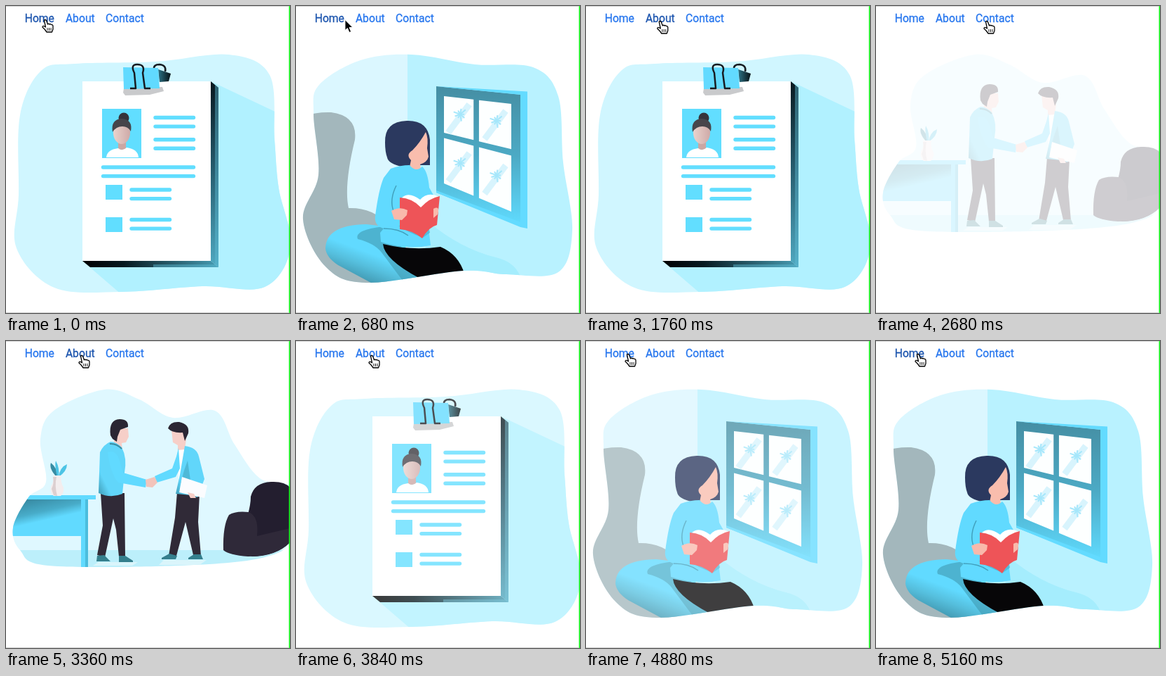
An HTML page for the animation above (5.2 s loop, 405 by 436 pixels).

```html
<!DOCTYPE html>
<html lang="en">
<head>
<meta charset="utf-8">
<title>Page transitions</title>
<style>
  html, body { margin: 0; width: 100%; height: 100%; overflow: hidden; background: #fff; }
  svg { display: block; width: 100vw; height: 100vh; }
  text { font: 15.7px Roboto, Inter, sans-serif; stroke-width: .3; }
  .sky { fill: #61daff; }
  .ink { fill: #2b2633; }
  .pants { fill: #302a37; }
  .shoe { fill: #347f8d; }
  .skin { fill: #f6cfc8; }
</style>
</head>
<body>
<svg viewBox="0 0 405 436">
  <defs>
    <linearGradient id="edgeBottom"><stop stop-color="#000"/><stop offset=".3" stop-color="#07191f"/><stop offset="1" stop-color="#479db4"/></linearGradient>
    <linearGradient id="edgeRight" x2="0" y2="1"><stop stop-color="#08181e"/><stop offset=".45" stop-color="#24596a"/><stop offset="1" stop-color="#4fa9c1"/></linearGradient>
    <linearGradient id="clipSide"><stop stop-color="#2b7386"/><stop offset="1" stop-color="#071014"/></linearGradient>
    <linearGradient id="portrait"><stop stop-color="#e9d3cd"/><stop offset="1" stop-color="#cfaaa8"/></linearGradient>
    <linearGradient id="cushion" x1=".1" y1=".9" x2=".5" y2=".2"><stop stop-color="#347f94"/><stop offset=".45" stop-color="#55bedc"/><stop offset=".7" stop-color="#61daff"/></linearGradient>
    <linearGradient id="frame" x2="0" y2="1"><stop stop-color="#458ea3"/><stop offset=".5" stop-color="#4caac5"/><stop offset="1" stop-color="#60dcff"/></linearGradient>
    <linearGradient id="deskFace" x2=".5" y2="1"><stop stop-color="#317d94"/><stop offset=".45" stop-color="#48acc9"/><stop offset=".65" stop-color="#61daff"/></linearGradient>
    <linearGradient id="jacket" x1="0" y1="1" x2=".5" y2=".5"><stop stop-color="#3b98b2"/><stop offset=".5" stop-color="#61d6fa"/></linearGradient>
    <clipPath id="aboutClip"><path data-smooth="20,155 50,92 98,82 214,79 318,69 376,98 383,190 389,259 406,342 369,399 280,398 165,406 69,400 15,344 18,268"/></clipPath>
    <clipPath id="homeClip"><path data-smooth="25,153 33,112 92,77 165,69 255,83 338,87 374,128 381,222 394,318 374,378 300,381 238,376 100,393 42,370 10,303 32,240"/></clipPath>
    <clipPath id="contactClip"><path data-smooth="10,265 32,222 57,200 49,140 68,99 140,69 190,83 238,109 298,99 326,147 362,195 410,210 408,280 365,308 245,319 60,319 20,297"/></clipPath>
  </defs>

  <g id="about">
    <g clip-path="url(#aboutClip)">
      <path fill="#d0f6ff" d="M0 60h405v350H0z"/>
      <path fill="#b1f1ff" d="M292 107L405 160V410H165L109 362z"/>
    </g>
    <path fill="url(#edgeBottom)" d="M109 362H292L303 371H120z"/>
    <path fill="url(#edgeRight)" d="M292 107L303 116V371L292 362z"/>
    <path fill="#5bbbd3" opacity=".45" d="M298 112L303 116V371H210V367H298z"/>
    <path fill="#fff" d="M109 107H292V362H109z"/>
    <path fill="#c9cacc" d="M168 117L223 115 225 121 205 126 170 127 167 123z"/>
    <path fill="none" stroke="#171b20" stroke-width="2.6" d="M211 90Q210 83 219 83 229 84 227 93"/>
    <path fill="url(#clipSide)" d="M217 90L235 96 232 107 219 108z"/>
    <path class="sky" d="M167 87L217 88 219 117 168 118z"/>
    <path fill="none" stroke="#171b20" stroke-width="2.5" stroke-linejoin="round" d="M177 117H185L183 95Q177 83 187 83 199 83 195 95L198 117H206"/>
    <path fill="#61deff" d="M137 146h56v70h-56zM142 254h24v21h-24zM142 300h24v21h-24z"/>
    <circle cx="168" cy="159" r="7.5" fill="#35333a"/>
    <path fill="#caa7a4" d="M160 190h11v14h-11z"/>
    <path fill="#fff" d="M143 215Q144 204 160 202 166 207 172 201 188 203 189 215z"/>
    <ellipse cx="165" cy="180" rx="12" ry="16" fill="url(#portrait)"/>
    <path fill="#46444a" d="M152 179Q149 161 165 160 181 161 178 178 174 171 166 171 157 171 152 179z"/>
    <path id="bars" stroke="#61deff" stroke-width="5.4" stroke-linecap="round"/>
  </g>

  <g id="home">
    <g clip-path="url(#homeClip)">
      <path fill="#dbf7ff" d="M0 60h160v340H0z"/>
      <path fill="#b9f2ff" d="M159 60h246v340H159z"/>
      <path fill="#a5edfd" d="M188 306Q235 345 285 357 315 364 322 390H180z"/>
      <path fill="#a3b7bc" d="M0 160Q25 150 50 151 88 156 84 190 68 255 75 287 110 286 130 310V410H0z"/>
      <path fill="url(#cushion)" d="M42 344Q43 311 100 310L145 315 180 400H120L60 368Q43 357 42 344z"/>
      <path fill="#4099b1" opacity=".6" d="M125 313Q82 318 88 331 112 337 122 350L152 390H180L134 316z"/>
      <path fill="#070608" d="M124 338Q165 348 206 342 232 353 240 380L175 386Q126 360 124 338z"/>
    </g>
    <path fill="url(#frame)" d="M200 114L322 126V313L200 265z"/>
    <path fill="#63dbff" d="M200 114L330 121.500V316L320 314V126zM200 262L320 307V314L200 265z"/>
    <g id="panes"></g>
    <path fill="#2b395f" d="M127 194Q126 164 158 163 188 162 191 190V226H177L154 229Q131 224 130 215 127 207 127 194z"/>
    <path fill="#f9bdad" d="M185 179Q189 187 187 202L189 214Q187 222 177 225L179 237 160 238 164 219Q156 211 166 205 177 194 185 179z"/>
    <path class="sky" d="M135 231Q149 226 162 226 171 237 180 228 188 235 190 258L198 272 187 298 192 340Q157 347 121 335L120 322 125 316Q111 312 113 298 118 260 125 244z"/>
    <path fill="none" stroke="#42a1bd" stroke-width="1.500" d="M143 255Q133 275 139 291M125 316Q147 316 160 326"/>
    <path fill="#4aaec9" opacity=".65" d="M146 312Q160 322 181 329L191 322 190 317z"/>
    <path fill="#fff" d="M151 272Q161 263 177 275 188 263 204 271L178 291z"/>
    <path fill="#ee5458" d="M148 272Q166 273 178 286 190 273 205 270L201 311Q189 314 180 330 165 318 148 317z"/>
    <path fill="#f9b9ab" d="M136 291Q148 284 159 290L158 297 151 304 140 303zM196 288Q206 283 202 296L196 301z"/>
  </g>

  <g id="contact">
    <g clip-path="url(#contactClip)">
      <path fill="#dff8ff" d="M0 60h412v240H0z"/>
      <path fill="#bceffb" d="M0 297h412v28H0z"/>
      <path fill="url(#deskFace)" d="M0 224h117v53H0z"/>
      <path class="sky" d="M0 219h128v6H0zM107 225h10v100h-10z"/>
      <path fill="#4bbddd" d="M113 225h4v100h-4z"/>
      <path fill="#daf5fb" d="M132 314h56l-8 5h-56zM225 311h61l-10 7h-58z"/>
    </g>
    <path fill="#231e2f" d="M345 246Q349 232 349 221 354 201 378 200 397 199 405 208V286Q385 306 350 306z"/>
    <path fill="#2f2939" d="M310 297Q309 262 318 247 327 241 346 243 361 249 358 277L405 266V286Q385 306 345 306 318 304 310 297z"/>
    <path fill="#388ca3" d="M72 193Q61 181 64 173 73 180 74 193z"/>
    <path fill="#4dc4e5" d="M73 193Q69 176 71 170 77 181 75 193zM75 193Q77 179 87 175 87 185 75 193z"/>
    <path fill="#f3edee" d="M67 191h12Q77 199 82 208 83 216 78 220H68Q62 216 64 206 69 200 67 191z"/>
    <path fill="#dccfd0" d="M67 193Q69 202 65 210L68 219 73 220Q69 205 72 193z"/>

    <g id="visitor">
      <path class="pants" d="M135 216h34L170 306H161L157 268 153 252 141 307 130 304 138 262z"/>
      <path class="shoe" d="M130 305l10-1 9 9h-20zM161 305h9l11 7v2h-20z"/>
      <path class="skin" d="M158 124h16l1 12-4 8-6 1 1 10h-12V137z"/>
      <path class="ink" d="M149 134Q146 112 162 111 175 111 174 122L163 126 159 136 158 143 152 139z"/>
      <path fill="url(#jacket)" d="M149 143Q157 143 165 151 173 166 169 187L166 217Q149 224 132 216L134 158Q139 147 149 143z"/>
      <path class="sky" d="M145 158Q156 154 161 167L167 187 201 197 199 208 160 201Q149 189 145 158z"/>
      <path fill="none" stroke="#398ca2" stroke-width="2" d="M148 146Q157 145 165 153"/>
    </g>
    <g id="host">
      <path class="pants" d="M244 215l32 2-2 40 4 48-10 3-12-51-13 48H232L241 251z"/>
      <path class="shoe" d="M233 302l11 3-2 5H222v-2zM268 303h10l3 7H260v-2z"/>
      <path fill="#fff" d="M246 151L257 149 259 190 246 196z"/>
      <path class="skin" d="M236 127l20-1 1 13-2 15-10 1V148l-7-4z"/>
      <path class="ink" d="M231 124Q234 114 247 115 262 118 260 131L255 142 252 130Q237 131 231 124z"/>
      <path fill="url(#jacket)" d="M255 149Q272 151 275 164L283 196 273 222 264 219 242 217 248 190z"/>
      <path class="sky" d="M246 152L243 164 237 181 212 192 215 201 242 193 248 181z"/>
      <path fill="#3e9cb4" opacity=".5" d="M259 170L263 198 249 202 254 184z"/>
      <path fill="#fbfcfe" d="M251 193L287 205 283 223 247 215z"/>
      <path class="skin" d="M259 215l9 2 3 6h-8z"/>
    </g>
    <path fill="#f2c4bb" d="M199 197l13-4 4 8-7 7-9-1z"/>
  </g>

  <g id="nav">
    <text x="26.700" y="23">Home</text>
    <text x="84.900" y="23">About</text>
    <text x="142" y="23">Contact</text>
  </g>
  <path fill="#d1d1d1" d="M0 0h403v1H0zM0 435h403v1H0z"/>
  <path fill="#12f51a" d="M403.500 0h1.500v436h-1.500z"/>

  <g id="cursor">
    <g id="hand" stroke="#000" stroke-width="1.300" stroke-linejoin="round">
      <path fill="#fff" d="M-2.500 1.500Q-1.500 -.5 .5 1.500L2.500 7Q3.500 5.200 5 7 6.500 5.800 7.500 7.500 9.500 7 10 9.500V14L8.500 18H1L-1.500 14.500 -5 11Q-5 8.500 -2 10L-.5 11z"/>
      <path fill="none" stroke-width=".9" d="M2 12v4M4.500 12v4M7 12v4"/>
    </g>
    <path id="arrow" stroke="#fff" d="M0 0V15L3.500 12 6 18 8.700 17 6.200 11H11z"/>
  </g>
</svg>
<script>
const LOOP = 5200, FADE = 300, DWELL = 540, TRAVEL = 300;
const byId = id => document.getElementById(id);
const pages = ['home', 'about', 'contact'];
const links = [...byId('nav').children];

// Clicks on the links, each with the place of the pointer.
const clicks = [
  { time: 40, page: 'home', x: 57, y: 19 },
  { time: 1200, page: 'about', x: 106, y: 21 },
  { time: 2330, page: 'contact', x: 159, y: 21 },
  { time: 3400, page: 'about', x: 109, y: 20 },
  { time: 4440, page: 'home', x: 61, y: 18 }
];

const mix = (a, b, k) => a + (b - a) * k;
const clamp = v => Math.min(1, Math.max(0, v));
const smooth = u => u * u * (3 - 2 * u);

// CSS "ease": cubic-bezier(.25, .1, .25, 1)
function ease(x) {
  let lo = 0, hi = 1, s;
  for (let i = 0; i < 20; i++) {
    s = (lo + hi) / 2;
    if (.75 * s * (1 - s) + s ** 3 < x) lo = s; else hi = s;
  }
  return .3 * s * (1 - s) ** 2 + 3 * s * s * (1 - s) + s ** 3;
}

// Closed Catmull-Rom curve through the listed points.
function smoothPath(text) {
  const pts = text.split(' ').map(p => p.split(',').map(Number));
  const at = i => pts[(i + pts.length) % pts.length];
  const lean = (p, a, b) => p.map((v, k) => v + (b[k] - a[k]) / 6);
  return 'M' + pts[0] + pts.map((p, i) => {
    const next = at(i + 1);
    return `C${lean(p, at(i - 1), next)} ${lean(next, at(i + 2), p)} ${next}`;
  }).join('') + 'z';
}

// The old page fades out before the new one fades in.
function pageAt(t, last) {
  if (last < 0) return ['about', 1];
  const phase = (t - clicks[last].time) / FADE;
  const before = last ? clicks[last - 1].page : 'about';
  return phase < 1 ? [before, 1 - ease(phase)] : [clicks[last].page, ease(clamp(phase - 1))];
}

// The pointer rests after a click, then glides to the next link.
function pointerAt(t, last) {
  const from = clicks[Math.max(last, 0)], to = clicks[last + 1] || from;
  const k = smooth(clamp((t - from.time - DWELL) / TRAVEL));
  return [mix(from.x, to.x, k), mix(from.y, to.y, k)];
}

function draw(t) {
  const last = clicks.filter(c => c.time <= t).length - 1;
  const [page, opacity] = pageAt(t, last);
  for (const id of pages) byId(id).setAttribute('opacity', id === page ? opacity : 0);

  const [x, y] = pointerAt(t, last);
  const over = (link, slack) => {
    const left = +link.getAttribute('x');
    return x > left - slack && x < left + link.getComputedTextLength() + slack;
  };
  const pointing = links.some(link => over(link, 0));
  byId('cursor').setAttribute('transform', `translate(${x} ${y})`);
  byId('hand').setAttribute('visibility', pointing ? 'visible' : 'hidden');
  byId('arrow').setAttribute('visibility', pointing ? 'hidden' : 'visible');

  for (const link of links) {
    const color = over(link, 2) && opacity > .95 ? '#1c55ae' : '#2676ee';
    link.setAttribute('fill', color);
    link.setAttribute('stroke', color);
  }
}

function drawBars() {
  const pair = (x, y, width) => [y, y + 12.6].map(v => `M${x} ${v}h${width}`).join('');
  byId('bars').setAttribute('d', pair(213, 158.5, 54.5) + pair(213, 189.7, 54.5)
    + pair(138.5, 229, 129) + pair(179, 261, 54.5) + pair(179, 303.5, 54.5));
}

// Four window panes on a slanted grid, each with a streak and a faint flower.
function drawPanes() {
  const point = (u, v) => [mix(211, 307, u), mix(mix(128, 139, u), mix(252, 292, u), v)];
  let art = '';
  for (const [u0, u1] of [[0, .44], [.52, 1]])
    for (const [v0, v1] of [[0, .42], [.48, 1]]) {
      const [x, y] = point((u0 + u1) / 2, (v0 + v1) / 2);
      const corners = [point(u0, v0), point(u1, v0), point(u1, v1), point(u0, v1)];
      art += `<path fill="#fdffff" d="M${corners.join('L')}z"/>
        <path stroke="#d8f4fd" stroke-width="9" d="M${x - 15} ${y + 22}l30 -40"/>`;
      for (let i = 0; i < 9; i++) {
        const angle = i * Math.PI * 2 / 9, r = 6 + i % 3 * 2;
        art += `<path stroke="#a6e7fb" stroke-width="2" d="M${x + 2} ${y - 4}l${r * Math.cos(angle)} ${r * Math.sin(angle)}"/>`;
      }
    }
  byId('panes').innerHTML = art;
}

for (const path of document.querySelectorAll('[data-smooth]'))
  path.setAttribute('d', smoothPath(path.dataset.smooth));
drawBars();
drawPanes();

function tick() {
  draw(performance.now() % LOOP);
  requestAnimationFrame(tick);
}
tick();
</script>
</body>
</html>
```
